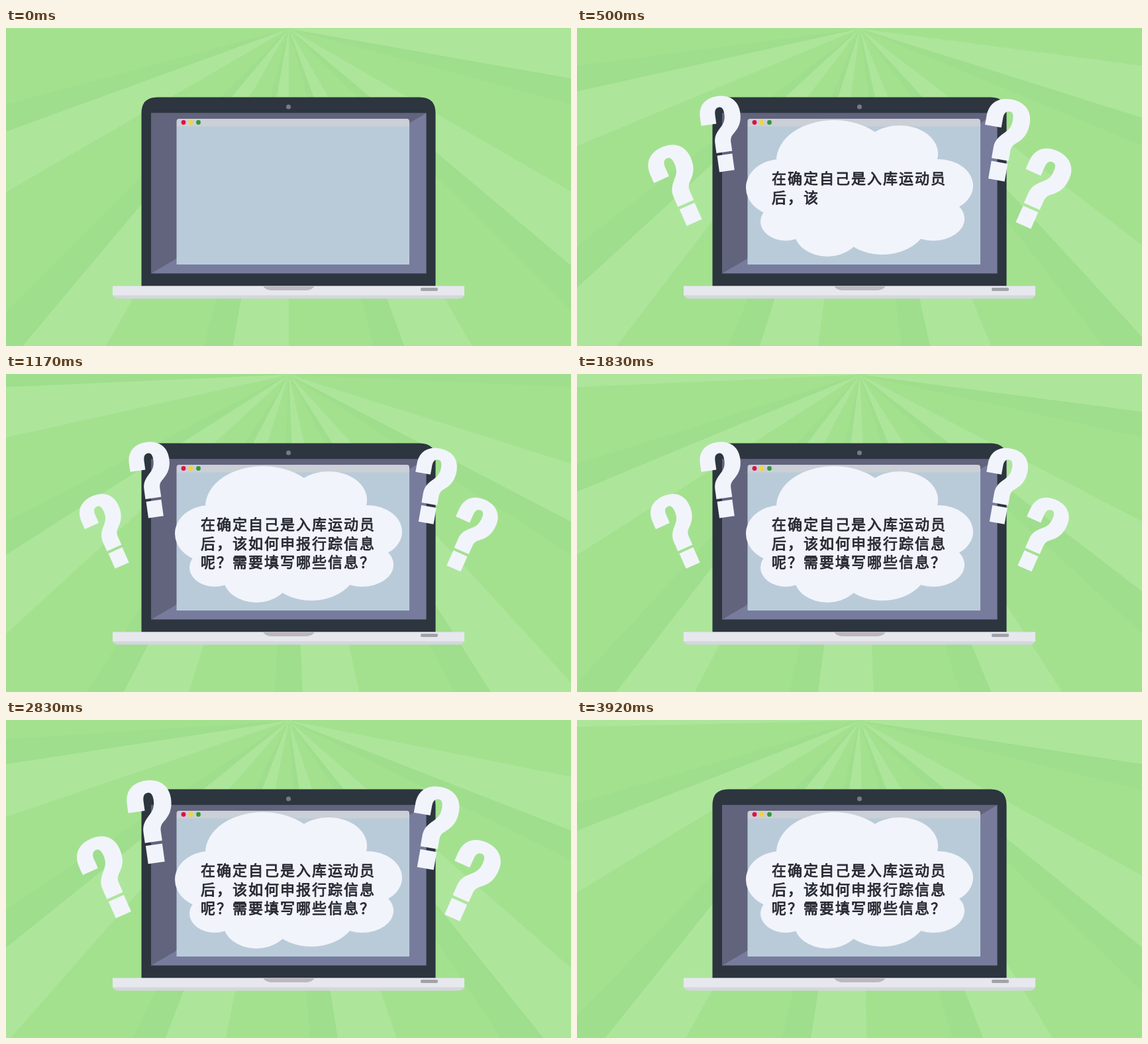
Animation, 853 px wide and 480 px high, one loop 4.01 s. Source, as an HTML page:

```html
<!DOCTYPE html>
<html lang="zh">
<head>
<meta charset="utf-8">
<style>
  html, body { margin: 0; width: 100%; height: 100%; overflow: hidden; }
  svg { display: block; width: 100vw; height: 100vh; background: #a3e18f; }
  text {
    font: 22px "Noto Sans CJK SC", "Noto Sans CJK", sans-serif; letter-spacing: 2px;
    fill: #292b34; stroke: #292b34; stroke-width: .9px; stroke-linejoin: round;
  }
</style>
</head>
<body>
<svg viewBox="0 0 853 480">
  <defs>
    <g id="mark">
      <path d="M-29-16V-28C-29-48-16-57 1-57C20-57 32-46 32-28C32-10 24-3 16 4C12 8 12 12 12 17V28H-12V14C-12 3-8-2 0-10C6-16 8-21 8-29C8-36 6-40 2-40C-4-40-6-36-6-28V-16Z"/>
      <path d="M-11.500 32H11.500V57H-11.500Z"/>
    </g>
  </defs>
  <g id="rays"></g>
  <path fill="#2d353f" d="M204.500 390V128.500Q204.500 104.500 228.500 104.500H624.500Q648.500 104.500 648.500 128.500V390Z"/>
  <path fill="#777c9d" d="M219 128.500H634.500V370.500H219Z"/>
  <path fill="#62637d" d="M219 128.500H634.500L219 370.500Z"/>
  <circle cx="426.500" cy="119" r="3.600" fill="#777983"/>
  <path fill="#b9cbd9" d="M257.500 148H609V357H257.500Z"/>
  <path fill="#cbcfd6" d="M257.500 148.500V141Q257.500 137 261.500 137H605Q609 137 609 141V148.500Z"/>
  <circle cx="268" cy="142.500" r="3.400" fill="#de1243"/>
  <circle cx="279" cy="142.500" r="3.400" fill="#f4d62c"/>
  <circle cx="290.500" cy="142.500" r="3.400" fill="#35973f"/>
  <path fill="#d5d6de" d="M161 389.500H692V403Q690 408.500 682 408.500H171Q163 408.500 161 403Z"/>
  <path fill="#e6e8ee" d="M161 389.500H692V403.500H161Z"/>
  <path fill="#bdb8bf" d="M388 389.500H466Q462 396 453 396H401Q392 396 388 389.500Z"/>
  <rect x="626" y="392" width="26" height="5" rx="2" fill="#a2a2aa"/>
  <g id="cloud" fill="#f2f4fb"></g>
  <g id="lines"></g>
  <g id="marks" fill="#f2f4fb"></g>
</svg>
<script>
const LOOP = 4010, STEP = LOOP / 48;
const $ = id => document.getElementById(id);
const add = (parent, tag, attrs) => {
  const el = document.createElementNS('http://www.w3.org/2000/svg', tag);
  for (const name in attrs) el.setAttribute(name, attrs[name]);
  return parent.appendChild(el);
};

// Angles run from the left edge, down and round to the right
const ray = (from, to, fill) => {
  const point = a => `${-1200 * Math.cos(a * Math.PI / 180)} ${1200 * Math.sin(a * Math.PI / 180)}`;
  add($('rays'), 'path', { d: `M0 0L${point(from)}L${point(to)}Z`, fill });
};
for (let a = 0; a < 360; a += 30) {
  ray(a + 15, a + 20, '#9fde8c');
  ray(a + 20, a + 30, '#ade69b');
}

const puffs = [
  [388, 200, 87, 61], [487, 190, 58, 43], [545, 238, 53, 40], [538, 288, 47, 33],
  [461, 290, 69, 52], [378, 307, 50, 38], [315, 292, 38, 29], [308, 241, 53, 43], [430, 245, 130, 70]
];
for (const [cx, cy, rx, ry] of puffs) add($('cloud'), 'ellipse', { cx, cy, rx, ry });

const lines = ['在确定自己是入库运动员', '后，该如何申报行踪信息', '呢？需要填写哪些信息？'];
const rows = lines.map((_, i) => add($('lines'), 'text', { x: 294, y: 235 + 28.5 * i }));

const marks = [
  { x: 152, y: 237, turn: -24, enter: 230, lift: 0 },
  { x: 218.5, y: 159.5, turn: -8, enter: 80, lift: 6 },
  { x: 644, y: 168.5, turn: 10, enter: 230, lift: 6 },
  { x: 699, y: 241.5, turn: 24, enter: 230, lift: 0 }
];
for (const mark of marks) mark.el = add($('marks'), 'use', { href: '#mark' });

const progress = (t, start, length) => Math.min(1, Math.max(0, (t - start) / length));
const smooth = p => p * p * (3 - 2 * p);
const backOut = p => 1 + 2.7 * (p - 1) ** 3 + 1.7 * (p - 1) ** 2;

function draw(t) {
  $('rays').setAttribute('transform', `translate(427 1) rotate(${60 * t / LOOP})`);

  const grow = backOut(progress(t, 0, 330));
  $('cloud').setAttribute('transform', `translate(427 242) scale(${grow}) translate(-427 -242)`);

  const typed = Math.floor(Math.max(0, t - 195) * 0.046);
  rows.forEach((row, i) => row.textContent = lines[i].slice(0, Math.max(0, typed - 11 * i)));

  for (const { el, x, y, turn, enter, lift } of marks) {
    const scale = backOut(progress(t, enter, 400)) * backOut(1 - progress(t, 2590, 440));
    const rise = lift * smooth(progress(t, 2330, 250));
    el.setAttribute('transform', `translate(${x} ${y - rise}) rotate(${turn}) scale(${scale})`);
  }
}

function tick(now) {
  draw(Math.floor((now % LOOP + 8) / STEP) * STEP);
  requestAnimationFrame(tick);
}
requestAnimationFrame(tick);
</script>
</body>
</html>
```
